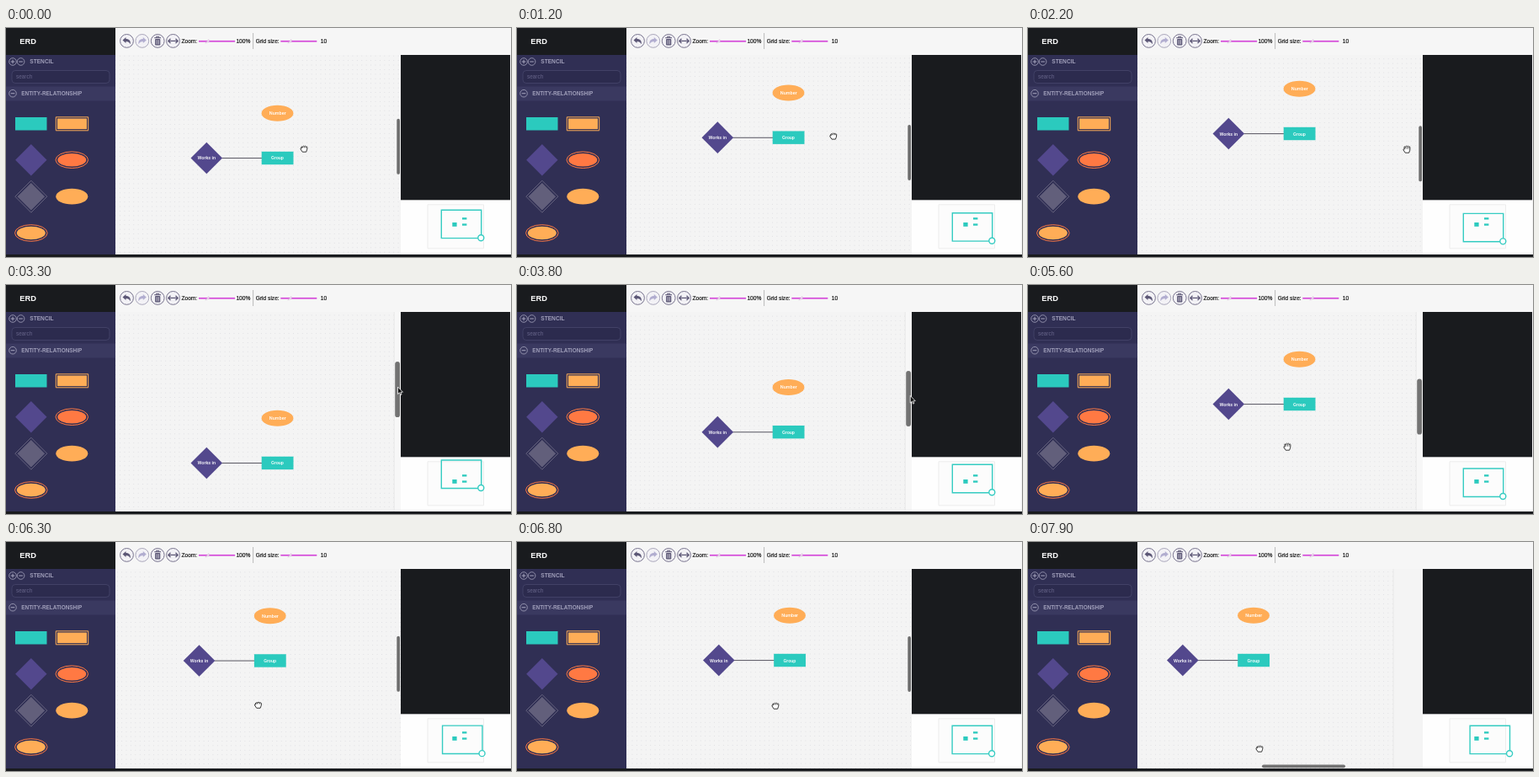
Recreate the animation shown at these times as an HTML page with a canvas. Size 600 by 272 pixels, loop 8 s.

```html
<!DOCTYPE html>
<html lang="en">
<head>
<meta charset="utf-8">
<title>ERD editor</title>
<style>
html, body { margin: 0; width: 100%; height: 100%; overflow: hidden; background: #f4f4f4; }
canvas { display: block; width: 600px; height: 272px; }
</style>
</head>
<body>
<canvas id="stage"></canvas>
<script>
const W = 600, H = 272, LOOP = 8000;
const SANS = '"Liberation Sans", Arial, sans-serif';
const LABEL = 'Roboto, "Liberation Sans", sans-serif';
const DARK = '#191b1e', TEAL = '#2bcabe', ORANGE = '#ffad57', RED = '#ff7943',
      PURPLE = '#53488d', INK = '#5d5877', PAPER = '#f4f4f4', SIDE = '#302f54';

const canvas = document.getElementById('stage');
const ratio = window.devicePixelRatio || 1;
canvas.width = W * ratio;
canvas.height = H * ratio;
const g = canvas.getContext('2d');

// Each track holds [time, x, y]; the diagram position is the centre of "Group".
const panTrack = [
  [0, 322.5, 154.5], [1500, 322.5, 125.5], [2600, 322.5, 125.5],
  [3300, 322.5, 211.5], [4300, 322.5, 138], [4500, 322.5, 141.5],
  [5700, 322.5, 141.5], [6250, 313, 141], [6800, 324, 140.5],
  [7200, 312, 140.5], [7900, 268, 140.5]
];
const handTrack = [
  [0, 354, 143], [1500, 380, 125], [2200, 450, 144], [2500, 464, 146],
  [2600, 464, 146], [3300, 465.5, 121], [4300, 469, 142], [4500, 469, 141],
  [4800, 450, 150], [5600, 308, 192], [5700, 308, 192], [6250, 299, 193],
  [6800, 307, 194], [7200, 297, 212], [7900, 275, 245]
];

function at(track, t) {
  let i = 1;
  while (i < track.length - 1 && track[i][0] < t) i++;
  const a = track[i - 1], b = track[i];
  const p = Math.min(1, Math.max(0, (t - a[0]) / (b[0] - a[0])));
  const e = p * .6 + p * p * (3 - 2 * p) * .4;
  return [a[1] + (b[1] - a[1]) * e, a[2] + (b[2] - a[2]) * e];
}

function box(x, y, w, h, color) {
  g.fillStyle = color;
  g.fillRect(x, y, w, h);
}

function paint(fill, stroke, width = 1) {
  if (fill) { g.fillStyle = fill; g.fill(); }
  if (stroke) { g.strokeStyle = stroke; g.lineWidth = width; g.stroke(); }
}

function oval(x, y, rx, ry, fill, stroke, width) {
  g.beginPath();
  g.ellipse(x, y, rx, ry, 0, 0, Math.PI * 2);
  paint(fill, stroke, width);
}

function diamond(x, y, r, fill, stroke, width) {
  g.beginPath();
  g.moveTo(x, y - r);
  g.lineTo(x + r, y);
  g.lineTo(x, y + r);
  g.lineTo(x - r, y);
  g.closePath();
  paint(fill, stroke, width);
}

function round(x, y, w, h, r, fill, stroke, width) {
  g.beginPath();
  g.roundRect(x, y, w, h, r);
  paint(fill, stroke, width);
}

function line(color, width, ...p) {
  g.beginPath();
  g.moveTo(p[0], p[1]);
  for (let i = 2; i < p.length; i += 2) g.lineTo(p[i], p[i + 1]);
  paint(null, color, width);
}

function text(s, x, y, font, color, align = 'left') {
  g.font = font;
  g.fillStyle = color;
  g.textAlign = align;
  g.textBaseline = 'alphabetic';
  g.fillText(s, x, y);
}

function sign(x, y, plus) {
  const c = '#a5a4bd';
  oval(x, y, 4.3, 4.3, null, c, .8);
  line(c, 1, x - 2.3, y, x + 2.3, y);
  if (plus) line(c, 1, x, y - 2.3, x, y + 2.3);
}

function sidebar() {
  box(0, 0, 130, 32, DARK);
  box(0, 32, 130, 237, SIDE);
  text('ERD', 16.3, 19, 'bold 9.3px ' + SANS, '#fff');
  sign(8, 40, true);
  sign(17.6, 40, false);
  text('STENCIL', 28.3, 42.4, 'bold 6.6px ' + SANS, '#a09fba');
  round(7, 50.5, 116, 15, 4, '#2c2b4e', '#454469', .9);
  text('search', 12, 60.2, '6.4px ' + SANS, '#67658a');
  box(0, 69.5, 130, 17, '#3a3960');
  sign(8, 77.7, false);
  text('ENTITY-RELATIONSHIP', 18.2, 80, 'bold 6.45px ' + SANS, '#a09fba');

  box(11, 106, 37.5, 15.5, TEAL);
  g.beginPath();
  g.rect(59.3, 105.8, 38.4, 16);
  paint(null, ORANGE, 1);
  box(61, 107.5, 35, 12.6, ORANGE);
  diamond(29.8, 156.7, 18.7, PURPLE);
  oval(78.3, 156.7, 19.3, 9.8, null, RED, 1);
  oval(78.3, 156.7, 17, 7.8, RED);
  diamond(29.8, 200.2, 19, null, '#66637f', 1);
  diamond(29.8, 200.2, 16.3, '#625f7b');
  oval(78.3, 200.2, 19, 9.4, ORANGE);
  oval(29.8, 243.5, 19.3, 9.8, null, RED, 1);
  oval(29.8, 243.5, 17, 7.8, ORANGE);
}

function bentArrow(x, dir, color) {
  g.save();
  g.translate(x, 15.3);
  g.scale(dir, 1);
  g.beginPath();
  g.moveTo(-5, -.8);
  g.lineTo(-1, -4.4);
  g.lineTo(-1, -2.2);
  g.bezierCurveTo(3, -2.2, 5, .5, 4.2, 4);
  g.bezierCurveTo(3, 1.5, 1.5, .8, -1, .8);
  g.lineTo(-1, 2.8);
  g.closePath();
  paint(color);
  g.restore();
}

function slider(x, thumb) {
  box(x, 14.9, 43, 1.7, '#d548da');
  g.beginPath();
  g.moveTo(thumb - 2.2, 17.8);
  g.lineTo(thumb + 2, 13.7);
  g.lineTo(thumb + 2.4, 16.2);
  g.closePath();
  paint('#f8eef8', '#c9a3cd', .5);
}

function toolbar() {
  box(130, 0, 470, 32, '#f6f6f6');
  [143.5, 161.8, 180.2, 198.5].forEach((x, i) =>
    oval(x, 15.4, 7.9, 7.9, '#f3f2f6', i === 1 ? '#aaa7bb' : '#77728d', 1));
  bentArrow(143.5, 1, INK);
  bentArrow(161.8, -1, '#b2aed0');

  line(INK, 1.1, 176.3, 11.7, 184.1, 11.7);
  line(INK, 1, 178.7, 11.3, 178.7, 10.2, 181.7, 10.2, 181.7, 11.3);
  round(177.1, 13, 6.2, 7.5, .8, INK);
  for (let x = 178.8; x < 182; x += 1.4) line('#f3f2f6', .5, x, 14.2, x, 19.3);

  line(INK, 1.3, 193, 15.4, 204, 15.4);
  line(INK, 1.3, 195.5, 12.8, 192.8, 15.4, 195.5, 18);
  line(INK, 1.3, 201.5, 12.8, 204.2, 15.4, 201.5, 18);

  const font = '6.6px ' + SANS;
  g.strokeStyle = '#222';
  g.lineWidth = .2;
  [['Zoom:', 208.5], ['100%', 273.4], ['Grid size:', 296.8], ['10', 373.8]].forEach(([s, x]) => {
    text(s, x, 17.8, font, '#111');
    g.strokeText(s, x, 17.8);
  });
  slider(229, 239);
  slider(326.3, 337);
  line('#aaa', .8, 293.6, 6, 293.6, 25);
}

const dot = 5.42;
function diagram(x, y) {
  g.save();
  g.beginPath();
  g.rect(130, 32, 339, 237);
  g.clip();
  box(130, 32, 339, 237, PAPER);
  const edge = x + 166;
  const phase = (v, start) => start + (((v - start) % dot) + dot) % dot;
  g.fillStyle = '#dcdce0';
  for (let px = phase(x - 19, 130); px < Math.min(469, edge); px += dot)
    for (let py = phase(y - 7.5, 32); py < 269; py += dot)
      g.fillRect(px - .45, py - .45, .9, .9);
  if (edge < 469) line('#e6e6e6', .8, edge, 32, edge, 269);

  line('#55535f', 1, x - 66, y + .1, x - 18, y + .1);
  diamond(x - 84.2, y, 18.8, PURPLE);
  oval(x, y - 53.2, 18.9, 9.5, ORANGE);
  box(x - 18.8, y - 7.7, 37.8, 15.4, TEAL);
  const font = '500 5.5px ' + LABEL;
  text('Works in', x - 84.2, y + 2, font, '#fff', 'center');
  text('Number', x + .2, y - 51.3, font, '#fff', 'center');
  text('Group', x, y + 2, font, '#fff', 'center');
  g.restore();
}

function scrollbars(t, x, y) {
  if (t >= 7250) {
    round(278 - (x - 268) * .29, 264.4, 99, 3.8, 1.9, '#737373');
    return;
  }
  const top = 107.8 - (y - 154.5) * .293;
  if (t >= 2550 && t < 6000) {
    box(461, 32, 8, 237, '#f7f7f7');
    line('#e3e3e3', .7, 461.2, 32, 461.2, 269);
    round(462.2, top, 5.8, 66, 2.9, '#737373');
  } else {
    round(464.3, top, 3.7, 66, 1.85, '#6e6e6e');
  }
}

function navigator(x, y) {
  box(469, 32, 131, 172.5, DARK);
  box(469, 204.5, 131, 64.5, '#fefefe');
  g.beginPath();
  g.rect(501, 209.8, 66.5, 52);
  paint('#fcfcfc', '#e9e9e9', .8);
  box(530.3, 231, 5.3, 4.8, TEAL);
  box(542, 225.2, 5.4, 2.3, TEAL);
  box(542, 232.4, 5.4, 2.3, TEAL);
  const vx = 517.3 - (x - 322.5) * .143, vy = 216.2 - (y - 154.5) * .143;
  g.beginPath();
  g.rect(vx, vy, 47.4, 33.4);
  paint(null, '#35ccc2', 1.4);
  oval(vx + 47, vy + 33, 3.5, 3.5, '#fff', '#35ccc2', 1.4);
  box(599, 32, 1, 237, '#f4f4f4');
}

function arrow(x, y) {
  g.beginPath();
  g.moveTo(x, y);
  g.lineTo(x, y + 8.6);
  g.lineTo(x + 2, y + 6.8);
  g.lineTo(x + 3.3, y + 9.6);
  g.lineTo(x + 4.6, y + 9);
  g.lineTo(x + 3.4, y + 6.3);
  g.lineTo(x + 6, y + 6.2);
  g.closePath();
  paint('#111', '#fff', .8);
}

function hand(x, y, closed) {
  g.save();
  g.translate(x, y);
  g.lineJoin = 'round';
  const tip = closed ? -2.6 : -3.6;
  g.beginPath();
  g.moveTo(-1.8, 4.2);
  g.lineTo(-4, .9);
  g.quadraticCurveTo(-4.4, -.9, -2.6, -.2);
  g.lineTo(-3.1, tip + .8);
  for (let i = 0; i < 4; i++) {
    const fx = -3 + i * 1.75, fy = tip + (i === 0 || i === 3 ? .6 : 0);
    g.lineTo(fx, fy + .5);
    g.quadraticCurveTo(fx + .85, fy - 1, fx + 1.7, fy + .5);
  }
  g.lineTo(3.7, 1.2);
  g.lineTo(2.6, 4.2);
  g.closePath();
  paint('#fff', '#222', .9);
  for (let i = 0; i < 3; i++)
    line('#333', .6, -1.3 + i * 1.75, tip + .5, -1.1 + i * 1.65, closed ? -.6 : -.2);
  g.restore();
}

function draw(t) {
  g.setTransform(ratio, 0, 0, ratio, 0, 0);
  const [x, y] = at(panTrack, t), [hx, hy] = at(handTrack, t);
  diagram(x, y);
  scrollbars(t, x, y);
  toolbar();
  sidebar();
  navigator(x, y);
  box(0, 269, W, 3, DARK);
  if (t >= 2450 && t < 4700) arrow(hx, hy);
  else hand(hx, hy, t < 1500 || t >= 5700);
}

function tick(now) {
  draw(now % LOOP);
  requestAnimationFrame(tick);
}
draw(0);
requestAnimationFrame(tick);
</script>
</body>
</html>
```
